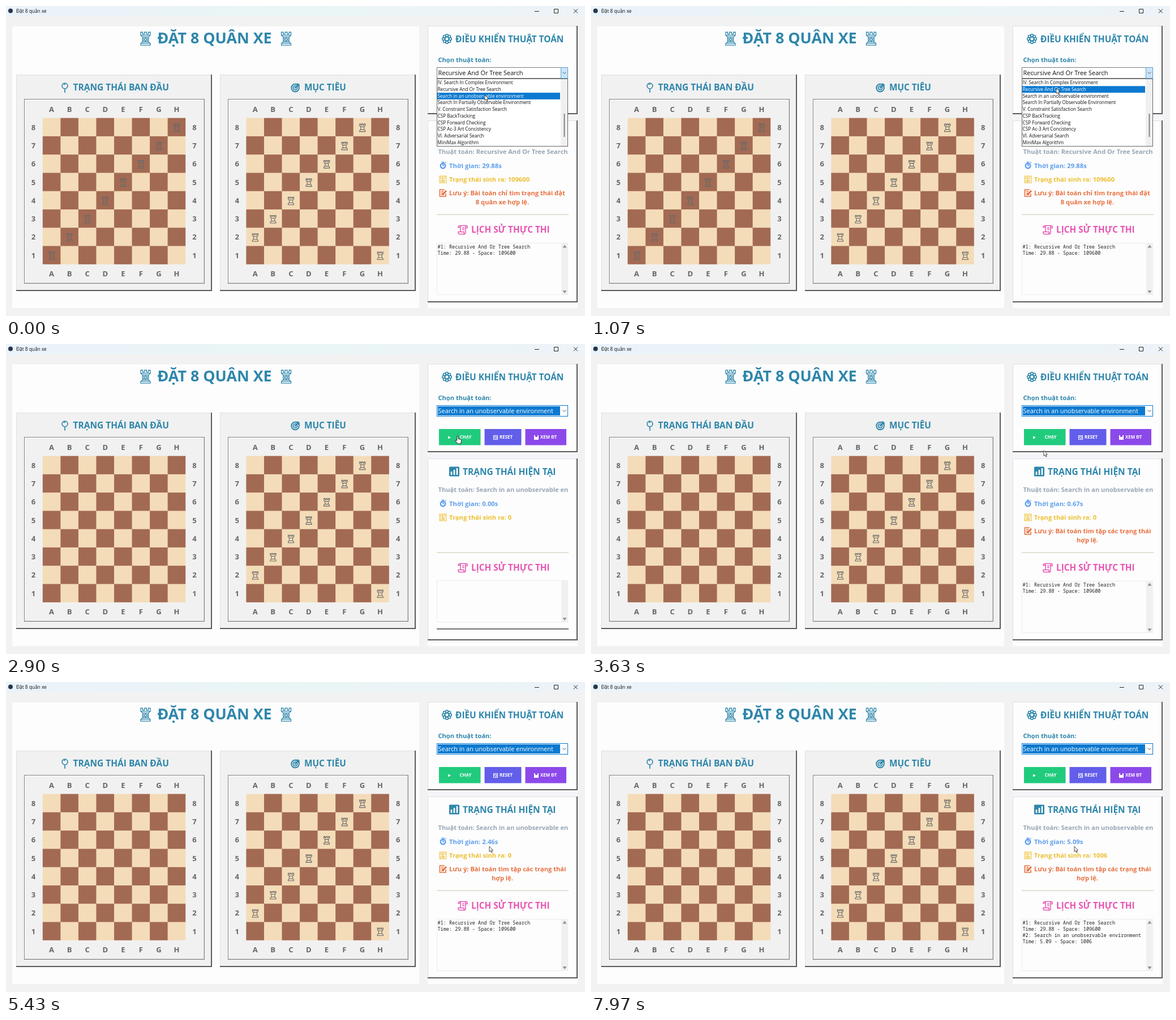
Animation, 1023 px wide and 547 px high, one loop 8 s. Source, as an HTML page:

```html
<!DOCTYPE html>
<html lang="vi">
<head>
<meta charset="utf-8">
<title>Đặt 8 quân xe</title>
<style>
html, body { margin: 0; width: 100%; height: 100%; overflow: hidden; background: #f2f2f2; }
svg { display: block; width: 1023px; height: 547px; font-family: "Open Sans", "Noto Sans", sans-serif; }
.b { font-weight: 700; }
.m { font-family: "Noto Sans Mono", monospace; font-size: 8.53px; white-space: pre; }
</style>
</head>
<body>
<svg id="stage" viewBox="0 0 1023 547"></svg>
<script>
const LOOP = 8000, PICK = 1650, START = 2840, READY = 3000, DONE = 7930, TICK = 223.3;
const TEAL = '#2e86ab', PINK = '#e755b2', BLUE = '#5f9fee', YELLOW = '#ecbf30', ORANGE = '#e87040';
const OLD = 'Recursive And Or Tree Search', NEW = 'Search in an unobservable environment';
const ROW = 11.75, LIST_TOP = 129.5, CELL_W = 31.55, CELL_H = 32.27, GRID_TOP = 197.6;
const OPTIONS = ['IV. Search In Complex Environment', OLD, NEW, 'Search In Partially Observable Environment',
  'V. Constraint Satisfaction Search', 'CSP BackTracking', 'CSP Forward Checking', 'CSP Ac-3 Art Concistency',
  'VI. Adversarial Search', 'MiniMax Algorithm'];

const rect = (x, y, w, h, fill, extra = '') => `<rect x="${x}" y="${y}" width="${w}" height="${h}" fill="${fill}" ${extra}/>`;
const frame = (x, y, w, h, color, fill = 'none') => rect(x + .5, y + .5, w - 1, h - 1, fill, `stroke="${color}"`);
const text = (x, y, size, fill, s, extra = 'class="b"') => `<text x="${x}" y="${y}" font-size="${size}" fill="${fill}" ${extra}>${s}</text>`;
const mid = (x, y, size, fill, s) => text(x, y, size, fill, s, 'class="b" text-anchor="middle"');
const line = (d, color, w = 1, extra = '') => `<path d="${d}" fill="none" stroke="${color}" stroke-width="${w}" ${extra}/>`;
const at = (x, y, s, scale = 1) => `<g transform="translate(${x} ${y}) scale(${scale})">${s}</g>`;
const group = (id, s) => `<g id="${id}">${s}</g>`;

const raised = (x, y, w, h, fill) => rect(x, y, w, h, fill) +
  line(`M${x + .5} ${y + h}V${y + .5}H${x + w}`, '#dedee8') +
  line(`M${x} ${y + h - 1}H${x + w - 1}V${y}`, '#5a5a5a', 2);

const ROOK = 'M-5-6.5h2v2h1.8v-2h2.4v2h1.8v-2h2v3.2l-2 1.8v5l2 1.7v1.8h-10v-1.8l2-1.7v-5l-2-1.8z';
const piece = line(ROOK + 'M-3-1.5h6M-3 3.5h6', '#686868', 1.1);
const bigRook = line(ROOK + 'M-5-3.4h10M-3-1.5h6M-3 .2h6M-3 1.9h6M-3 3.5h6M-5 5h10M0-1.5v1.7M-1.3.2v1.7M1.3.2v1.7M0 1.9v1.6', TEAL, .75);

function board(dx, gridLeft, rooks) {
  let s = raised(dx + 18, 121, 346, 382, '#f1f1f1') + frame(dx + 33, 165, 318, 325, '#fff') +
    frame(dx + 32, 164, 319, 326, '#808080') + line(`M${dx + 33} 488.5H${dx + 349.5}V165`, '#d4d4d4') +
    rect(gridLeft, GRID_TOP, 8 * CELL_W, 8 * CELL_H, '#f4dcb8');
  for (let i = 0; i < 8; i++) {
    const x = gridLeft + CELL_W * (i + .5), y = 218.7 + CELL_H * i;
    for (const ly of [186.7, 477]) s += mid(x, ly, 13, '#666', 'ABCDEFGH'[i]);
    for (const lx of [48.5, 333]) s += mid(gridLeft - 64.8 + lx, y, 13, '#666', 8 - i);
    for (let c = 1 - i % 2; c < 8; c += 2)
      s += rect(gridLeft + CELL_W * c, GRID_TOP + CELL_H * i, CELL_W, CELL_H, '#a36a53');
  }
  return s + rooks;
}
const rooks = (gridLeft, shift) => [...'01234567'].map(c =>
  at(gridLeft + 16 + CELL_W * c, 440.5 - CELL_H * ((+c + shift) % 8), piece)).join('');

const petals = Array.from({ length: 8 }, (_, i) => {
  const a = i * Math.PI / 4;
  return `<circle cx="${6 * Math.cos(a)}" cy="${6 * Math.sin(a)}" r="2.3"/>`;
}).join('');
const ring = (r, color, w = 1.4) => `<circle r="${r}" fill="none" stroke="${color}" stroke-width="${w}"/>`;
const icons = {
  pin: ring(5, TEAL, 1.6) + line('M0 5V12M-2-2a3 3 0 0 1 3-1', TEAL, 1.7),
  target: ring(6.8, TEAL, 2) + ring(3.6, TEAL, 1.8) + `<circle r="1.4" fill="${TEAL}"/>` + line('M0 0L7-7M4-8V-4H8', TEAL, 2),
  gear: `<g fill="none" stroke="${TEAL}" stroke-width="1.6">${petals}<circle r="3.3"/></g>`,
  chart: rect(-9, -8.5, 18, 17, TEAL, 'rx="1.5"') + line('M-5 6V0M0 6V-3M5 6V-6', '#fff', 2.6),
  scroll: line('M-4 4V-7H6Q8-7 8-5V-3H5M-4-7Q-8-7-8-4H-4M5-7V5Q5 8 2 8H-6Q-8 8-8 4H2Q2 8 4 8M-1-3H3M-1 0H3', PINK, 1.5),
  watch: ring(4.3, BLUE, 2.4) + line('M0-7V-5M-2.5-6.5H2.5M4-5L5.5-6.5M0 .5V-3M0 0H2', BLUE, 1.6),
  numbers: frame(-6.5, -6.5, 13, 13, YELLOW) + line('M-3.5-4.5V-1M2.5-4H4.5M2.5-1.5H4.5M-4.5 1.5H-2M-4.5 4H-2M2.5 1V4.5M-.2-5V5', YELLOW, 1.7),
  note: line('M3-6H-5.5V6H5V1M-3-3H1M-3 0H0M-3 3H2', ORANGE, 1.7) + line('M-1 3L6-4', ORANGE, 3)
};

const button = (x, w, color, label, lx, icon) => rect(x, 150, w, 28.5, color) + text(lx, 167.2, 7.9, '#fff', label) + icon;

const windowBar = '<defs><linearGradient id="bar"><stop stop-color="#eaf3fa"/><stop offset=".5" stop-color="#eaf5f5"/><stop offset="1" stop-color="#edf3f8"/></linearGradient>' +
  '<clipPath id="clip"><rect x="761" y="245" width="233" height="25"/></clipPath></defs>' +
  rect(0, 0, 1023, 18, 'url(#bar)') + '<circle cx="8" cy="8.5" r="4" fill="#25364d"/>' +
  text(18, 12, 8.35, '#111', 'Đặt 8 quân xe', '') +
  line('M934 9.5H942M968.5 5.5H975.5V12.5H968.5ZM1003 5.5L1010 12.5M1010 5.5L1003 12.5', '#222');

const LEFT_GRID = 64.8, RIGHT_GRID = 424.4;
const leftSide = rect(11, 36, 719, 497, '#fdfdfd') +
  at(246.5, 57.3, bigRook, 1.7) + text(267.5, 66.2, 26.8, TEAL, 'ĐẶT 8 QUÂN XE') + at(495, 57.3, bigRook, 1.7) +
  board(0, LEFT_GRID, group('startRooks', rooks(LEFT_GRID, 0))) + board(360, RIGHT_GRID, rooks(RIGHT_GRID, 1)) +
  at(104, 141, icons.pin) + text(118.5, 149, 15.5, TEAL, 'TRẠNG THÁI BAN ĐẦU') +
  at(511, 144.5, icons.target) + text(527, 149, 15.3, TEAL, 'MỤC TIÊU');

const combo = group('comboOpen', frame(761, 108, 232, 20, '#7a7a7a', '#fff') + frame(980, 108, 13, 20, '#5aa2d8', '#cce4f7') +
    text(763.5, 122.3, 10.95, '#111', OLD, '')) +
  group('comboDone', frame(761, 108, 232, 20, '#0078d7', '#fff') + rect(763, 110, 216, 16, '#0b79d0') +
    text(763.5, 122.3, 10.95, '#fff', NEW, '')) + line('M983.5 116.5L986.5 119.5L989.5 116.5', '#555');

const controls = raised(745, 35, 265, 156, '#fdfdfd') + at(779, 58, icons.gear) +
  text(794, 63.5, 15.4, TEAL, 'ĐIỀU KHIỂN THUẬT TOÁN') + text(763.5, 99.3, 11.1, TEAL, 'Chọn thuật toán:') + combo +
  button(765, 73.5, '#20cb7d', 'CHẠY', 801.5, '<path d="M781 162.5L786 165L781 167.5Z" fill="#fff"/>') +
  button(845.5, 65, '#625eea', 'RESET', 872, frame(861, 161, 8, 8, '#fff') + line('M863 166V163.5H867V166.5H864', '#fff')) +
  button(917.5, 72.5, '#8c49ea', 'XEM ĐT', 944, rect(933, 161, 8, 8, '#fff') + rect(935, 161, 4, 3, '#8c49ea'));

const arrow = (y, dir) => `<path d="M983.5 ${y}H990.5L987 ${y + 5 * dir}Z" fill="#909090"/>`;
const logLines = (y, lines) => lines.map((s, i) => text(762.5, y + 11 * i, 8.53, '#222', s, 'class="m"')).join('');
const history = group('log', frame(761, 418, 232, 92, '#ececf4', '#fdfdfd') + rect(981, 418, 12, 92, '#f0f0f0') + arrow(426.5, -1) + arrow(502, 1) +
    logLines(427.5, ['#1: ' + OLD, 'Time: 29.88 - Space: 109600']) +
    group('result', logLines(449.5, ['#2: ' + NEW, 'Time: 5.09 - Space: 1006']))) +
  group('blankLog', frame(761, 417, 232, 74, '#ececf4', '#fdfdfd') + rect(981, 418, 12, 72, '#f0f0f0') + arrow(483, 1) + rect(761, 502, 233, 1.5, '#444'));

const note = (id, first, second) => group(id, at(772, 330, icons.note) + text(783, 334, 11.15, ORANGE, first) + mid(877, 349.7, 11.15, ORANGE, second));
const status = raised(745, 202, 265, 321, '#fdfdfd') + at(792, 225, icons.chart) +
  text(807, 230.7, 15.5, TEAL, 'TRẠNG THÁI HIỆN TẠI') +
  text(763.5, 261.3, 11.1, '#98a6b6', '', 'id="algorithm" class="b" clip-path="url(#clip)"') +
  at(772, 282, icons.watch) + text(783, 285.5, 11.3, BLUE, '', 'id="time" class="b"') +
  at(772, 306, icons.numbers) + text(783, 310, 11.2, YELLOW, '', 'id="count" class="b"') +
  note('oldNote', 'Lưu ý: Bài toán chỉ tìm trạng thái đặt', '8 quân xe hợp lệ.') +
  note('newNote', 'Lưu ý: Bài toán tìm tập các trạng thái', 'hợp lệ.') +
  rect(761, 367.5, 233, 1, '#c5c3a8') + at(807, 394.5, icons.scroll) + text(822, 400, 15.3, PINK, 'LỊCH SỬ THỰC THI') + history;

const dropdown = group('dropdown', frame(761, 128, 232, 120, '#666', '#fff') + rect(980, 129, 12, 118, '#f0f0f0') + rect(985.5, 190, 2, 41, '#858585') +
  rect(762, 0, 217, ROW, '#0b79d0', 'id="hover"') +
  OPTIONS.map((s, i) => text(762.5, 138.2 + ROW * i, 8.2, '#111', s, 'class="option"')).join(''));

const cursor = '<g id="cursor" stroke-linejoin="round" stroke="#222">' +
  '<path id="pointer" d="M0 0V9.5L2.2 7.6L3.8 11L5.3 10.3L3.8 7H6.5Z" fill="#fff" stroke-width=".8"/>' +
  '<path id="hand" d="M-1.2 8.5V.8Q0-.8 1.2.8V5.2L5.8 6.4Q7 7 6.6 9L5.6 14H.2L-4 9Q-4.4 7.4-2.8 7.6Z" fill="#fff"/></g>';

document.getElementById('stage').innerHTML = windowBar + leftSide + rect(745, 36, 265, 497, '#fdfdfd') +
  rect(745, 191, 265, 11, '#f5f5f9') + controls + status + dropdown + cursor;

const $ = id => document.getElementById(id);
const show = (id, on) => $(id).style.display = on ? '' : 'none';
const optionTexts = document.querySelectorAll('.option');

// Cursor stops: time, x, y
const PATH = [[0, 846, 157], [350, 846, 157], [1000, 822, 145], [1150, 822, 145], [1500, 828, 158], [1700, 828, 158],
  [2130, 767, 150], [2550, 798, 162], [3250, 798, 162], [4250, 804, 242], [4500, 804, 242], [5300, 854, 290], [LOOP, 854, 290]];

function cursorAt(t) {
  const i = PATH.findIndex(p => p[0] > t), [t0, x0, y0] = PATH[i - 1], [t1, x1, y1] = PATH[i];
  const p = (t - t0) / (t1 - t0), k = p * p * (3 - 2 * p);
  return [x0 + (x1 - x0) * k, y0 + (y1 - y0) * k];
}

function render() {
  const t = performance.now() % LOOP, [x, y] = cursorAt(t);
  const open = t < PICK, started = t >= START, done = t >= DONE;
  const row = Math.floor((y - LIST_TOP) / ROW);
  const onButton = !open && y >= 149.5 && y < 179 && x >= 765 && x < 990;
  const seconds = !started ? 29.88 : done ? 5.09 : Math.floor((t - START) / TICK) * TICK / 1000;

  show('dropdown', open);
  show('comboOpen', open);
  show('comboDone', !open);
  $('hover').setAttribute('y', LIST_TOP + ROW * row);
  optionTexts.forEach((o, i) => o.setAttribute('fill', i === row ? '#fff' : '#111'));

  show('startRooks', !started);
  show('oldNote', !started);
  show('newNote', t >= READY);
  show('blankLog', started && t < READY);
  show('log', !started || t >= READY);
  show('result', done);
  $('algorithm').textContent = 'Thuật toán: ' + (started ? NEW : OLD);
  $('time').textContent = `Thời gian: ${seconds.toFixed(2)}s`;
  $('count').textContent = 'Trạng thái sinh ra: ' + (!started ? 109600 : done ? 1006 : 0);

  $('cursor').setAttribute('transform', `translate(${x} ${y})`);
  show('pointer', !onButton);
  show('hand', onButton);
  requestAnimationFrame(render);
}
render();
</script>
</body>
</html>
```
